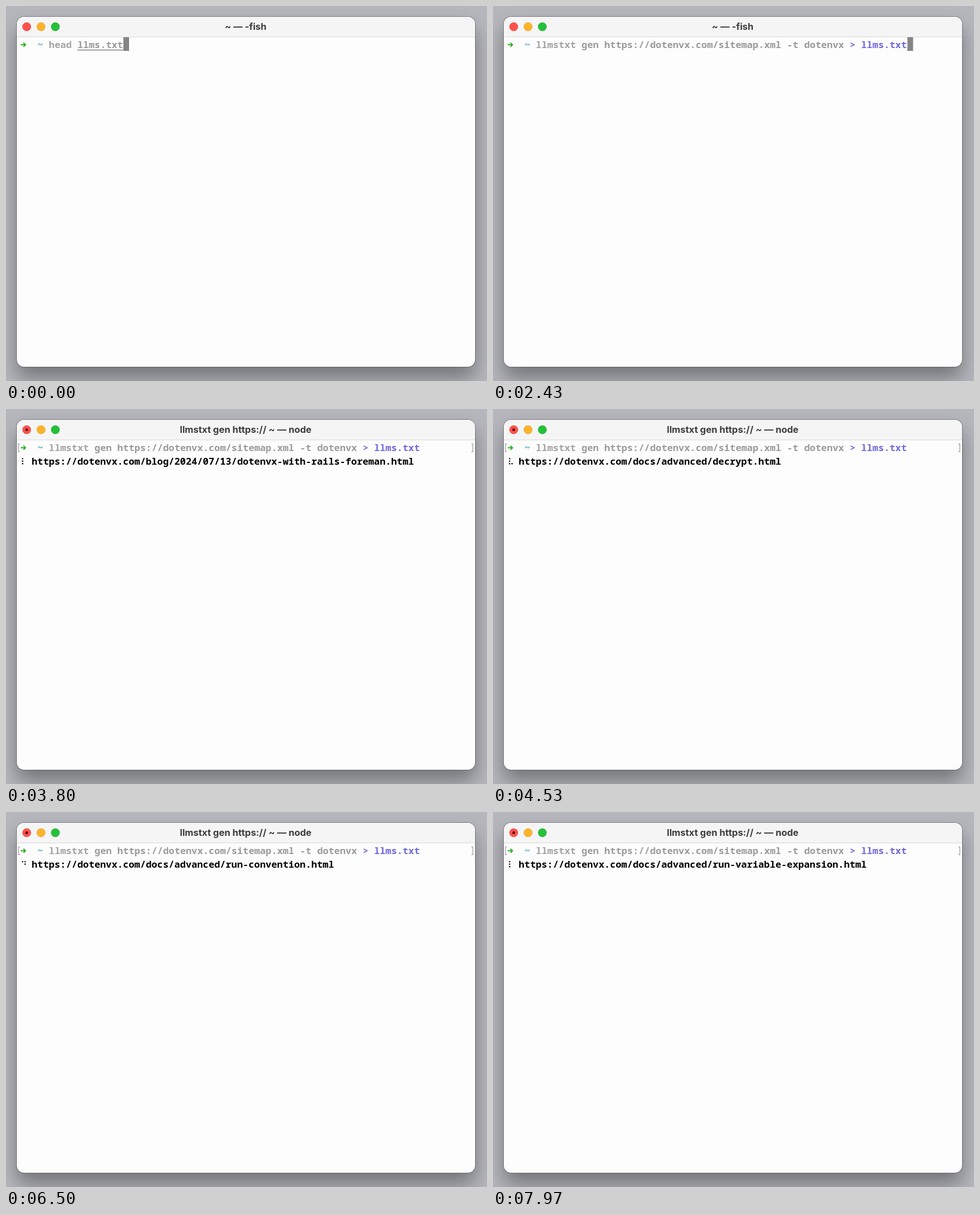
Animation of 848x660 px, one loop 8 s. Source, as an HTML page:

```html
<!DOCTYPE html>
<html lang="en">
<head>
<meta charset="utf-8">
<title>Terminal</title>
<style>
  html, body { margin: 0; width: 100%; height: 100%; overflow: hidden; }
  body { position: relative; background: #b6b7bd; }
  .window {
    position: absolute; left: 19px; top: 19px; width: 808px; height: 616px;
    border-radius: 13px; background: #fdfdfd;
    box-shadow: 0 0 0 1px rgba(60, 60, 66, .45), 0 20px 34px rgba(0, 0, 0, .36);
  }
  .bar {
    height: 35px; border-bottom: 1px solid #dadada;
    border-radius: 13px 13px 0 0; background: #f5f5f5;
  }
  svg { position: absolute; left: 0; top: 0; }
  text { white-space: pre; }
  .mono { font: 600 16.78px "Noto Sans Mono", "DejaVu Sans Mono", monospace; }
  .title { font: 700 16.4px Inter, sans-serif; fill: #3d3d3d; text-anchor: middle; }
  .cmd { fill: #a4a4a4; }
  .arg { fill: #9b9b9b; }
  .redirect { fill: #706bdc; }
</style>
</head>
<body>
<div class="window"><div class="bar"></div></div>
<svg width="848" height="660" viewBox="0 0 848 660">
  <g stroke-width=".8">
    <circle cx="36.5" cy="36.5" r="7.3" fill="#ff524e" stroke="#e2433f"/>
    <circle cx="61.8" cy="36.5" r="7.3" fill="#fdb429" stroke="#e0a02a"/>
    <circle cx="87" cy="36.5" r="7.3" fill="#24c138" stroke="#1dab30"/>
  </g>
  <circle id="busy" cx="36.5" cy="36.5" r="2.5" fill="#6d0906"/>
  <text id="title" class="title" x="422.5" y="41.5"></text>
  <path d="M26 68.2H34M30.8 64.7L34.4 68.2L30.8 71.7" fill="none" stroke="#2fae25" stroke-width="2"/>
  <path id="marks" d="M24.5 61.5H22V75H24.5M820.5 61.5H823V75H820.5" fill="none" stroke="#a2a2a2" stroke-width="1.3"/>
  <g class="mono">
    <text x="55.4" y="74" fill="#35a3b9">~</text>
    <g id="head">
      <text x="75.6" y="74"><tspan class="cmd">head </tspan><tspan class="arg">llms.txt</tspan></text>
      <rect x="126" y="76.5" width="80.5" height="2" fill="#9b9b9b"/>
    </g>
    <text id="gen" x="75.6" y="74"><tspan class="cmd">llmstxt</tspan><tspan class="arg"> gen https://dotenvx.com/sitemap.xml -t dotenvx </tspan><tspan class="redirect">&gt; llms.txt</tspan></text>
    <text id="row1" x="45.3" y="98"></text>
    <text id="row2" x="25.2" y="122"></text>
  </g>
  <rect id="cursor" width="10" height="24" fill="#858585"/>
  <g id="spinner"></g>
</svg>
<script>
const LOOP = 8000, RECALL = 270, ENTER = 2830, SPIN = 3111, SPIN_STEP = 82.5;
const CELL = 10.07, LEFT = 25.2, FIRST_ROW = 77;
const SITE = "https://dotenvx.com";
const BLOG = "/blog/2024/", DOCS = "/docs/advanced/";

// start time, page being fetched
const pages = [
  [3111, ""],
  [3210, "/blog.html"],
  [3320, BLOG + "06/24/dotenvx-next-generation-config-management-for-teams.html"],
  [3460, BLOG + "07/02/dotenvx-with-docker.html"],
  [3600, BLOG + "07/13/dotenvx-with-rails-foreman.html"],
  [3930, BLOG + "07/18/using-dotenvx-with-docker-compose-v2.html"],
  [4100, "/changelog.html"],
  [4260, "/docs.html"],
  [4420, DOCS + "decrypt.html"],
  [4600, DOCS + "decrypt-exclude-env-file-key.html"],
  [4780, DOCS + "encrypt-stdout.html"],
  [4950, DOCS + "get-all.html"],
  [5140, DOCS + "get-json.html"],
  [5370, DOCS + "get-overload.html"],
  [5570, DOCS + "get-shell.html"],
  [5780, DOCS + "ls-exclude-env-file-all.html"],
  [5980, DOCS + "prebuild.html"],
  [6160, DOCS + "precommit.html"],
  [6340, DOCS + "run-convention.html"],
  [6620, DOCS + "run-debug.html"],
  [6800, DOCS + "run-env-file.html"],
  [6980, DOCS + "run-environment-variables-in-code.html"],
  [7180, DOCS + "run-overload.html"],
  [7380, DOCS + "run-quiet.html"],
  [7580, DOCS + "run-shell-expansion.html"],
  [7780, DOCS + "run-variable-expansion.html"]
];
const spinFrames = "⠋⠙⠹⠸⠼⠴⠦⠧⠇⠏";

const $ = id => document.getElementById(id);
const show = (id, on) => { $(id).style.visibility = on ? "visible" : "hidden"; };

// The six upper braille dots: left column, then right column.
const dots = Array.from({ length: 6 }, (_, i) => {
  const dot = document.createElementNS("http://www.w3.org/2000/svg", "circle");
  dot.setAttribute("cx", i < 3 ? 29.3 : 33.6);
  dot.setAttribute("cy", 87.4 + (i % 3) * 4.4);
  dot.setAttribute("r", 1.2);
  return $("spinner").appendChild(dot);
});

function moveCursor(col, row) {
  $("cursor").setAttribute("x", LEFT + col * CELL + .5);
  $("cursor").setAttribute("y", 55 + row * 24);
}

function drawSpinner(t) {
  const step = Math.floor((t - SPIN) / SPIN_STEP) % spinFrames.length;
  const bits = t < SPIN ? 0 : spinFrames.charCodeAt(step) - 0x2800;
  dots.forEach((dot, i) => { dot.style.opacity = bits >> i & 1; });
}

function draw(t) {
  const recalled = t >= RECALL, running = t >= ENTER;
  show("head", !recalled);
  show("gen", recalled);
  show("busy", running);
  show("marks", running);
  show("cursor", t < SPIN);
  $("title").textContent = running ? "llmstxt gen https:// ~ — node" : "~ — -fish";
  if (running) moveCursor(0, 1);
  else moveCursor(recalled ? 70 : 18, 0);

  const page = pages.filter(([start]) => start <= t).pop();
  const url = page ? SITE + page[1] : "";
  $("row1").textContent = url.slice(0, FIRST_ROW);
  $("row2").textContent = url.slice(FIRST_ROW);
  drawSpinner(t);
}

const begin = performance.now();
function tick() {
  draw((performance.now() - begin) % LOOP);
  requestAnimationFrame(tick);
}
tick();
</script>
</body>
</html>
```
